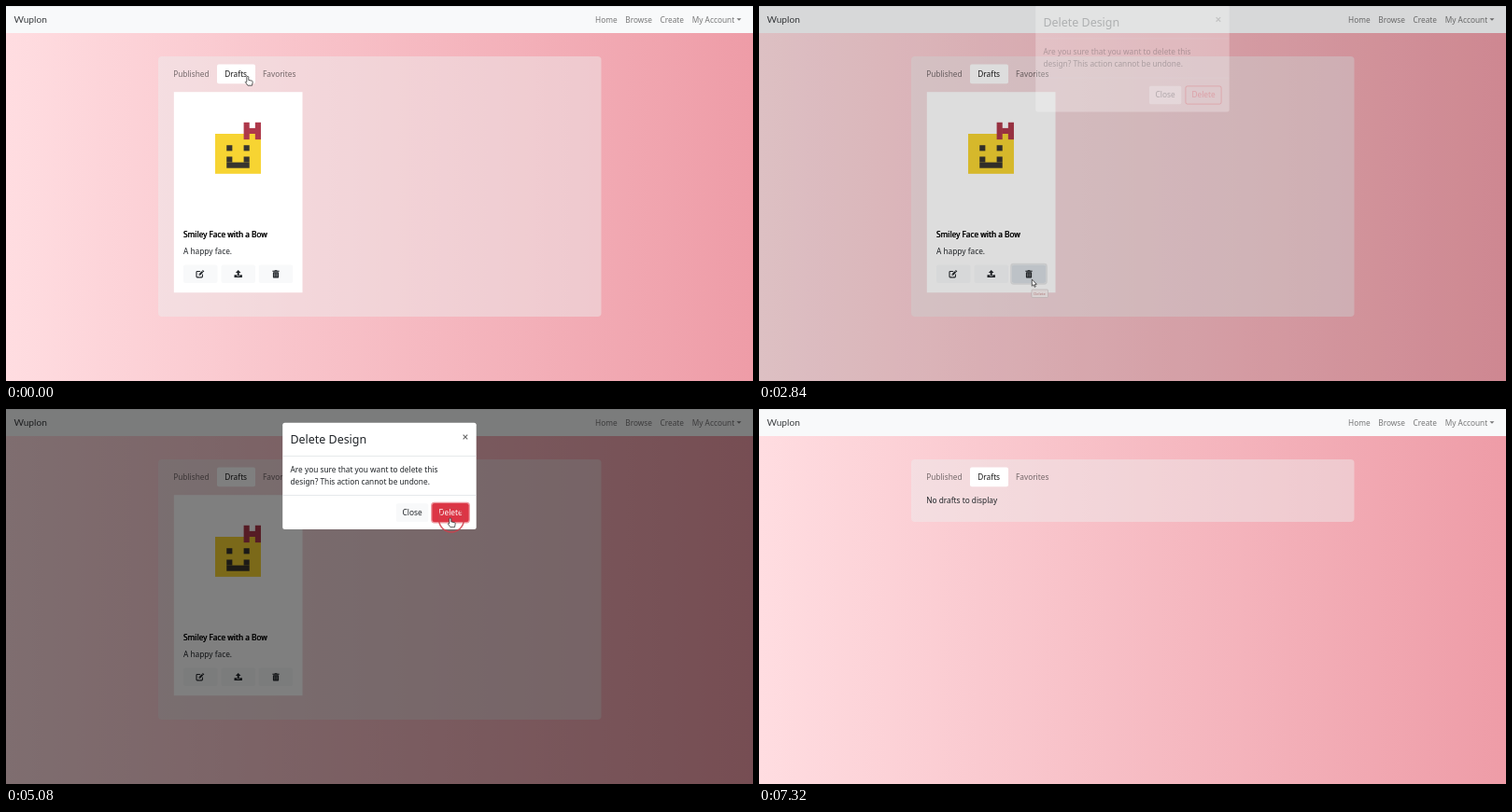
These frames come from a looping animation (800x402 px, 7360 ms). An HTML page with a canvas:

```html
<!DOCTYPE html>
<html lang="en">
<head>
<meta charset="utf-8">
<title>Delete a draft</title>
<style>
html, body { margin: 0; width: 100%; height: 100%; overflow: hidden; }
canvas { display: block; width: 800px; height: 402px; }
</style>
</head>
<body>
<canvas id="stage" width="800" height="402"></canvas>
<script>
const ctx = document.getElementById('stage').getContext('2d');
const LOOP = 7360, STEP = 40;
const SANS = '"Noto Sans", "Open Sans", sans-serif';
const INK = '#212529', MUTED = 'rgba(0,0,0,.52)', RED = '#dc3545';
const OPEN_AT = 2800, CLOSE_AT = 5100, EMPTY_AT = 5160;

const sky = ctx.createLinearGradient(0, 0, 800, 0);
sky.addColorStop(0, '#ffdde1');
sky.addColorStop(1, '#ee9ca7');

const HAND = new Path2D('M-1.2 .9a1 1 0 0 1 2 0v3l3.6 .8q1 .3 .8 1.4l-.7 3.6h-4.6l-2.6-3.6q.3-1 1.5-.2z');
const ARROW = new Path2D('M0 0v7.2l1.7-1.5 1.1 2.6 1.2-.5-1.1-2.5h2.2z');

// pointer stops: time, x, y
const STOPS = [
  [0, 259, 75.5], [360, 259, 75.5], [1120, 279.3, 200], [1560, 279.3, 200],
  [2120, 292.3, 293], [3080, 292.3, 293], [3240, 303, 276], [4000, 420, 170],
  [4560, 476, 117], [5540, 476, 117], [6240, 494, 112], [7040, 500, 52], [7300, 504, -12]
];

const clamp = v => Math.max(0, Math.min(1, v));
const ramp = (t, from, len) => clamp((t - from) / len);
const smooth = p => p * p * (3 - 2 * p);
const easeOut = p => 1 - Math.pow(1 - p, 2);
const mix = (a, b, p) => a + (b - a) * p;

function text(str, x, y, color = INK, size = 8.3, font = SANS) {
  ctx.font = `${size}px ${font}`;
  ctx.fillStyle = color;
  ctx.fillText(str, x, y);
}

function rect(x, y, w, h, color) {
  ctx.fillStyle = color;
  ctx.fillRect(x, y, w, h);
}

function box(x, y, w, h, r, color) {
  ctx.beginPath();
  ctx.roundRect(x, y, w, h, r);
  ctx.fillStyle = color;
  ctx.fill();
}

function outline(x, y, w, h, r, color, width) {
  ctx.beginPath();
  ctx.roundRect(x, y, w, h, r);
  ctx.strokeStyle = color;
  ctx.lineWidth = width;
  ctx.stroke();
}

function poly(points, color) {
  ctx.beginPath();
  points.forEach(([x, y]) => ctx.lineTo(x, y));
  ctx.closePath();
  ctx.fillStyle = color;
  ctx.fill();
}

function navbar() {
  rect(0, 0, 800, 29, '#f8f9fa');
  rect(0, 0, 800, 0.6, '#e3e6e8');
  text('Wuplon', 8.5, 18, '#3c3f42', 10.2, 'Lato, sans-serif');
  text('Home', 631, 17.5, MUTED);
  text('Browse', 663.3, 17.5, MUTED);
  text('Create', 700.5, 17.5, MUTED);
  text('My Account', 734.7, 17.5, MUTED);
  poly([[782.5, 13.3], [787.5, 13.3], [785, 15.8]], MUTED);
}

function smiley() {
  const s = 6.12;
  const cells = (col, row, w, h, color) =>
    rect(224 + col * s, 137 + row * s, w * s, h * s, color);
  cells(0, 0, 8, 7, '#f7d432');
  const dark = '#38352f', bow = '#ae394b';
  cells(2, 2, 1, 1, dark);
  cells(5, 2, 1, 1, dark);
  cells(2, 4, 1, 1, dark);
  cells(5, 4, 1, 1, dark);
  cells(2, 5, 4, 1, dark);
  cells(5, -2, 1, 3, bow);
  cells(7, -2, 1, 3, bow);
  cells(5.9, -1, 1.2, 1, bow);
}

function editIcon(x, y) {
  outline(x - 4, y - 2.8, 6.4, 6.4, 0.8, INK, 1.1);
  ctx.save();
  ctx.translate(x, y);
  ctx.rotate(-Math.PI / 4);
  rect(-2.6, -1.9, 7.4, 3.8, '#f8f9fa');
  rect(-0.6, -1, 4, 2, INK);
  rect(3.8, -1, 1.3, 2, INK);
  poly([[-0.6, -1], [-0.6, 1], [-2.3, 0]], INK);
  ctx.restore();
}

function uploadIcon(x, y) {
  poly([[x, y - 4.2], [x + 2.8, y - 1.2], [x + 1, y - 1.2], [x + 1, y + 1.6],
    [x - 1, y + 1.6], [x - 1, y - 1.2], [x - 2.8, y - 1.2]], INK);
  poly([[x - 4.2, y + 1], [x - 1.6, y + 1], [x - 1.6, y + 2.2], [x + 1.6, y + 2.2],
    [x + 1.6, y + 1], [x + 4.2, y + 1], [x + 4.2, y + 3.8], [x - 4.2, y + 3.8]], INK);
}

function trashIcon(x, y) {
  rect(x - 3.6, y - 3.6, 7.2, 1.1, INK);
  rect(x - 1.3, y - 4.2, 2.6, 0.8, INK);
  box(x - 3.1, y - 2, 6.2, 6.1, 0.7, INK);
  for (const dx of [-1.6, 0, 1.6]) rect(x + dx - 0.25, y - 1, 0.5, 4, '#b9bcbe');
}

function card(t) {
  rect(179.8, 92.2, 137.7, 215, '#fff');
  smiley();
  const title = 'Smiley Face with a Bow';
  text(title, 189.8, 248.2, '#000');
  text(title, 190.2, 248.2, '#000');
  text('A happy face.', 190, 266);

  const hover = ramp(t, 2040, 150) * (1 - ramp(t, 3160, 150));
  box(190, 277.5, 36.5, 19.5, 2, '#f8f9fa');
  box(230.5, 277.5, 36.5, 19.5, 2, '#f8f9fa');
  if (t >= 2640 && t < OPEN_AT + 80) outline(270, 276.7, 38, 21.1, 2.6, 'rgba(216,217,219,.6)', 1.7);
  box(270.8, 277.5, 36.4, 19.5, 2,
    `rgb(${mix(248, 218, hover)},${mix(249, 224, hover)},${mix(250, 229, hover)})`);
  editIcon(208, 287.3);
  uploadIcon(248.7, 287.3);
  trashIcon(289, 287.3);
}

function panel(t) {
  const empty = t >= EMPTY_AT;
  box(163, 54, 474.5, empty ? 67 : 279, 4, 'rgba(236,238,238,.46)');
  box(226, 62.5, 41, 20.7, 2, '#fff');
  text('Published', 179.2, 75.7, MUTED);
  text('Drafts', 234.3, 75.7, 'rgba(0,0,0,.9)');
  text('Favorites', 275, 75.7, MUTED);
  if (empty) text('No drafts to display', 179.2, 101);
  else card(t);
}

function modal(t) {
  const closing = t >= CLOSE_AT;
  const fade = closing ? 1 - ramp(t, CLOSE_AT, 150) : ramp(t, OPEN_AT, 150);
  if (fade <= 0) return;
  const slide = closing ? easeOut(ramp(t, CLOSE_AT, 300)) : 1 - easeOut(ramp(t, OPEN_AT, 300));
  rect(0, 0, 800, 402, `rgba(0,0,0,${0.5 * fade})`);

  ctx.save();
  ctx.globalAlpha = fade;
  ctx.translate(0, -20.75 * slide);
  box(296.2, 14.8, 207.5, 114.2, 2.5, '#fff');
  rect(296.2, 50.2, 207.5, 0.6, '#d5dade');
  rect(296.2, 92.3, 207.5, 0.6, '#d5dade');
  text('Delete Design', 304.5, 37.4, INK, 12.45);
  ctx.strokeStyle = '#6b6b6b';
  ctx.lineWidth = 1.2;
  ctx.beginPath();
  ctx.moveTo(489.6, 27.7); ctx.lineTo(494.2, 32.3);
  ctx.moveTo(494.2, 27.7); ctx.lineTo(489.6, 32.3);
  ctx.stroke();
  text('Are you sure that you want to delete this', 304.5, 68);
  text('design? This action cannot be undone.', 304.5, 80.5);
  box(417.8, 101.3, 34.6, 19.6, 2, '#f8f9fa');
  text('Close', 424.5, 114);

  const hover = ramp(t, 4480, 150);
  if (t >= 5000) outline(456, 100.6, 40, 21, 2.8, 'rgba(220,53,69,.5)', 1.8);
  box(456.7, 101.3, 38.6, 19.6, 2, `rgba(220,53,69,${hover})`);
  outline(456.9, 101.5, 38.2, 19.2, 2, RED, 0.8);
  text('Delete', 463.4, 114,
    `rgb(${mix(220, 255, hover)},${mix(53, 255, hover)},${mix(69, 255, hover)})`);
  ctx.restore();
}

function tooltip(t) {
  if (t < 2600 || t >= OPEN_AT + 80) return;
  box(292, 304, 17.5, 8.5, 1, '#fbf3f3');
  outline(292, 304, 17.5, 8.5, 1, '#cfc4c4', 0.6);
  text('Delete', 294.2, 310, '#c98a8a', 4.2);
}

function ring(x, y) {
  ctx.beginPath();
  ctx.arc(x, y, 13.4, 0, Math.PI * 2);
  ctx.strokeStyle = 'rgba(208,62,74,.85)';
  ctx.lineWidth = 1.5;
  ctx.stroke();
}

function pointerAt(t) {
  const i = STOPS.findIndex(s => s[0] > t);
  if (i < 0) return STOPS[STOPS.length - 1].slice(1);
  const a = STOPS[i - 1], b = STOPS[i];
  const p = smooth((t - a[0]) / (b[0] - a[0]));
  return [mix(a[1], b[1], p), mix(a[2], b[2], p)];
}

function pointer(t) {
  const [x, y] = pointerAt(t);
  const onTab = t < OPEN_AT && y < 83;
  const onCard = t < OPEN_AT && y > 92 && y < 277;
  const onDelete = t > 4400 && t < 5140 && x > 456 && y < 121;
  if (t >= 2640 && t < 2840) ring(x + 0.6, y + 1.4);
  if (t >= 5000 && t < 5120) ring(x + 1, y + 1.6);
  const shape = onTab || onCard || onDelete ? HAND : ARROW;
  ctx.save();
  ctx.translate(x, y);
  ctx.fillStyle = '#fff';
  ctx.strokeStyle = '#333';
  ctx.lineWidth = 0.8;
  ctx.lineJoin = 'round';
  ctx.fill(shape);
  ctx.stroke(shape);
  ctx.restore();
}

function draw(t) {
  rect(0, 0, 800, 402, sky);
  navbar();
  panel(t);
  tooltip(t);
  modal(t);
  pointer(t);
}

const start = performance.now();
function tick() {
  const t = (performance.now() - start) % LOOP;
  draw(Math.floor(t / STEP) * STEP);
  requestAnimationFrame(tick);
}
tick();
</script>
</body>
</html>
```
